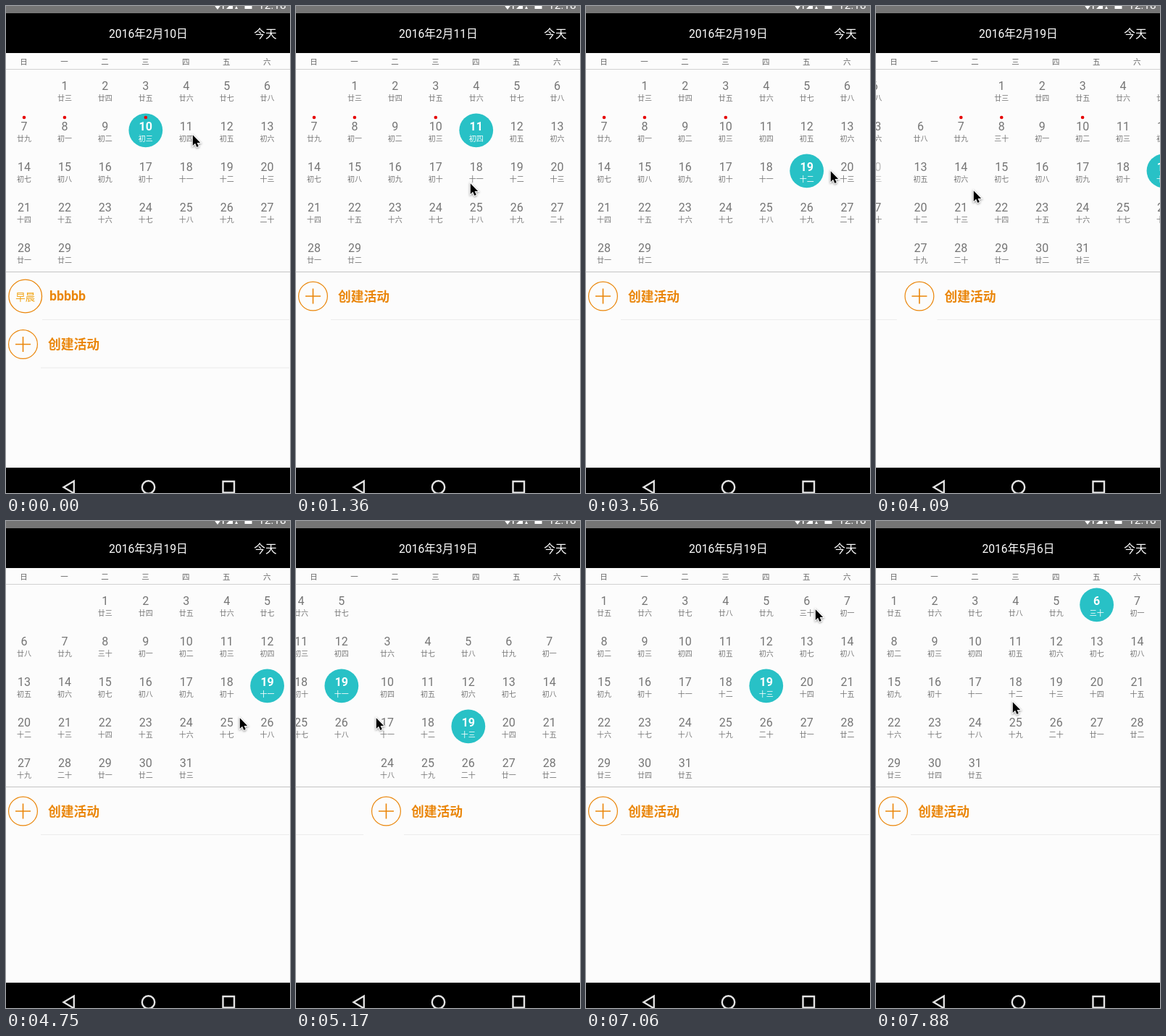
An HTML page with a canvas for the animation above (8 s loop, 392x673 px).

```html
<!DOCTYPE html>
<html lang="zh-CN">
<head>
<meta charset="utf-8">
<title>日历</title>
<style>
html, body { margin: 0; width: 100%; height: 100%; overflow: hidden; background: #fcfcfc; }
canvas { display: block; width: 392px; height: 673px; }
</style>
</head>
<body>
<canvas></canvas>
<script>
const W = 392, H = 673, LOOP = 8000;
const YEAR = 2016, FIRST_MONTH = 2, PAGES = 4;
const PAGE = 398.7, COL = 55.93, ROW = 56;
const GREY = '#757575', TEAL = '#28c1c6', ORANGE = '#ea860a', ICON = '#e4e4e4';
const FONT = 'Roboto, "Noto Sans CJK SC", "Noto Sans CJK", sans-serif';
const NUMERALS = '一二三四五六七八九十';

const canvas = document.querySelector('canvas');
const ctx = canvas.getContext('2d');
const dpr = window.devicePixelRatio || 1;
canvas.width = W * dpr;
canvas.height = H * dpr;

// time, day
const taps = [[0, 10], [940, 11], [2170, 25], [2800, 26], [3300, 19], [7420, 6]];

// start, duration
const swipes = [[3740, 490], [4750, 700], [6410, 520]];

// arrival time, x, y; the pointer rests until GLIDE ms before each arrival
const GLIDE = 420;
const stops = [
  [0, 257, 178], [710, 240, 161], [1120, 240, 245], [2110, 260, 286], [2570, 301, 282],
  [3560, 337, 228], [4090, 134, 255], [4450, 322, 272], [5170, 110, 272],
  [6180, 257, 270], [6350, 348, 154], [6660, 160, 156], [7060, 316, 122], [7880, 188, 250],
];

const clamp = v => Math.min(1, Math.max(0, v));
const smooth = u => u * u * (3 - 2 * u);
const easeInOut = u => u < .5 ? 4 * u ** 3 : 1 - 4 * (1 - u) ** 3;

function pointerAt(t) {
  const next = stops.findIndex(stop => stop[0] > t);
  if (next < 0) return stops[stops.length - 1].slice(1);
  const [from, x0, y0] = stops[next - 1], [to, x1, y1] = stops[next];
  const travel = Math.min(GLIDE, to - from);
  const k = smooth(clamp((t - to + travel) / travel));
  return [x0 + (x1 - x0) * k, y0 + (y1 - y0) * k];
}

function pageAt(t) {
  return swipes.reduce((sum, [start, span]) => sum + easeInOut(clamp((t - start) / span)), 0);
}

// Lunar months follow the mean lunation, counted from 10 January.
function lunarDay(dayOfYear) {
  const k = Math.ceil((dayOfYear - 9.2) / 29.53) - 1;
  return dayOfYear - Math.floor(10.2 + 29.53 * k) + 1;
}

function lunarName(n) {
  if (n <= 10) return '初' + NUMERALS[n - 1];
  if (n % 10 === 0) return NUMERALS[n / 10 - 1] + '十';
  return (n < 20 ? '十' : '廿') + NUMERALS[n % 10 - 1];
}

function text(str, x, baseline, size, color, weight = 400, align = 'center') {
  ctx.font = `${weight} ${size}px ${FONT}`;
  ctx.textAlign = align;
  ctx.fillStyle = color;
  ctx.fillText(str, x, baseline);
}

function rect(x, y, w, h, color) {
  ctx.fillStyle = color;
  ctx.fillRect(x, y, w, h);
}

function disc(x, y, r, color) {
  ctx.beginPath();
  ctx.arc(x, y, r, 0, 7);
  ctx.fillStyle = color;
  ctx.fill();
}

function ring(x, y, r, color, width) {
  ctx.beginPath();
  ctx.arc(x, y, r, 0, 7);
  ctx.strokeStyle = color;
  ctx.lineWidth = width;
  ctx.stroke();
}

function stroke(path, color, width) {
  ctx.strokeStyle = color;
  ctx.lineWidth = width;
  ctx.stroke(new Path2D(path));
}

function drawMonth(month, selected, marked, pressed) {
  const days = new Date(YEAR, month, 0).getDate();
  const offset = new Date(YEAR, month - 1, 1).getDay();
  const daysBefore = (Date.UTC(YEAR, month - 1) - Date.UTC(YEAR, 0)) / 864e5;
  for (let day = 1; day <= days; day++) {
    const cell = offset + day - 1;
    const x = 25 + cell % 7 * COL;
    const y = 110 + Math.floor(cell / 7) * ROW;
    const active = day === selected;
    const color = active ? '#fff' : day === pressed ? '#bdbdbd' : GREY;
    if (active) disc(x, y + 5.8, 23.4, TEAL);
    text(day, x, y + 5.7, 16, color, active ? 700 : 400);
    text(lunarName(lunarDay(daysBefore + day)), x, y + 20.8, 10, color);
    if (marked.includes(day)) disc(x, y - 12, 2.3, '#e60000');
  }
}

function drawCreateRow(y) {
  ring(23.5, y, 19.9, ORANGE, 1.2);
  stroke(`M13 ${y}h21M23.5 ${y - 10.5}v21`, ORANGE, 1.6);
  text('创建活动', 58, y + 6.8, 17.8, ORANGE, 700, 'left');
  rect(48, y + 32, 343, 1, '#ececec');
}

function drawEvents(hasEvent) {
  if (!hasEvent) return drawCreateRow(401);
  ring(26.7, 401, 22.8, ORANGE, 1.3);
  text('早晨', 26.7, 406.5, 13.4, '#f0a312');
  text('bbbbb', 60, 407.3, 17.8, ORANGE, 700, 'left');
  rect(50, 433, 341, 1, '#ececec');
  drawCreateRow(467.5);
}

function drawBars(month, day) {
  rect(0, 0, W, 10, GREY);
  ctx.fillStyle = '#fff';
  ctx.fill(new Path2D('M286 -3h12l-6 8zM304 4h9v-9zM316 4h4l-2 -4z'));
  rect(299, 0, 1.5, 4, '#fff');
  rect(329.5, -6, 10, 10, '#fff');
  text('12:18', 367.3, 4, 15.5, '#fff');

  rect(0, 10, W, 55, '#000');
  text(`${YEAR}年${month}月${day}日`, 196.4, 44.3, 15.7, '#fff');
  text('今天', 358, 44.3, 15.7, '#fff');
  [...'日一二三四五六'].forEach((name, i) => text(name, 24.6 + i * COL, 81, 10.5, '#666'));
  rect(0, 87, W, 1, '#d2d2d2');
  rect(0, 367, W, 1, '#c4c4c4');

  rect(0, 638, W, 35, '#000');
  stroke('M79.5 665L93.8 656.5V673.5Z', ICON, 2.3);
  ring(196.5, 665, 8.7, ICON, 2.4);
  stroke('M299.5 657h15.5v15.5h-15.5z', ICON, 2.4);
}

function drawPointer(x, y) {
  const arrow = new Path2D('M0 0V14.6L3.3 11.5L5.6 16.6L8 15.5L5.8 10.6H10.4Z');
  ctx.save();
  ctx.translate(x + .8, y + .3);
  ctx.shadowColor = 'rgba(0,0,0,.45)';
  ctx.shadowBlur = 3 * dpr;
  ctx.shadowOffsetY = dpr;
  ctx.strokeStyle = '#fff';
  ctx.lineWidth = 2;
  ctx.stroke(arrow);
  ctx.shadowColor = 'transparent';
  ctx.fillStyle = '#000';
  ctx.fill(arrow);
  ctx.restore();
}

function render(t) {
  const page = pageAt(t);
  const month = FIRST_MONTH + Math.floor(page);
  const [, day] = taps.filter(tap => tap[0] <= t).pop();
  const marked = month === FIRST_MONTH ? [7, 8, 10] : [];
  const pressed = page > 0 && page < 1 ? 20 : 0;

  ctx.setTransform(dpr, 0, 0, dpr, 0, 0);
  rect(0, 0, W, H, '#fcfcfc');
  for (let i = 0; i < PAGES; i++) {
    if (Math.abs(i - page) >= 1) continue;
    ctx.save();
    ctx.translate((i - page) * PAGE, 0);
    drawMonth(FIRST_MONTH + i, day, marked, i === 0 ? pressed : 0);
    drawEvents(marked.includes(day));
    ctx.restore();
  }
  drawBars(month, day);
  drawPointer(...pointerAt(t));
}

const start = performance.now();
function tick() {
  render((performance.now() - start) % LOOP);
  requestAnimationFrame(tick);
}
tick();
</script>
</body>
</html>
```
